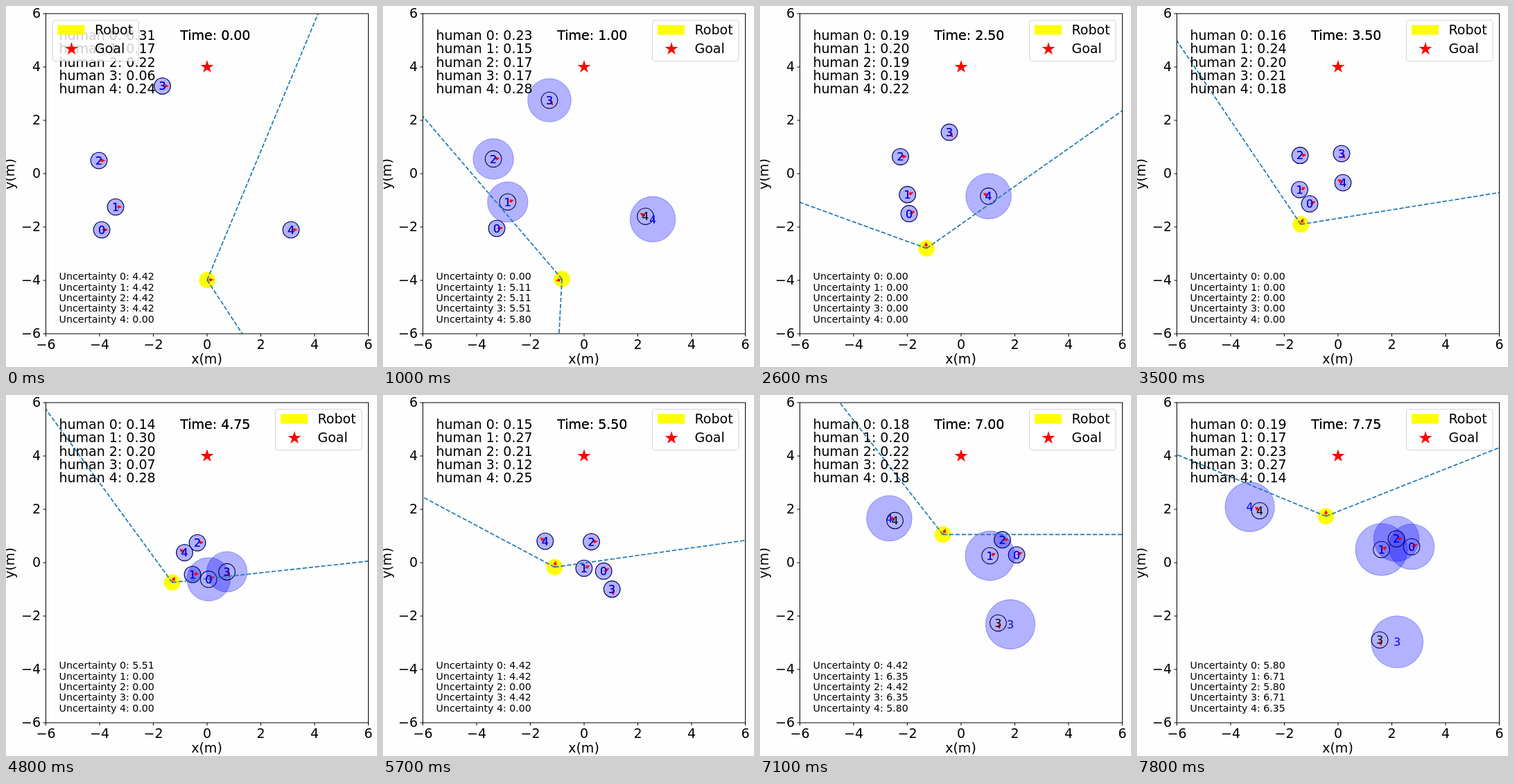
These frames come from a looping animation (535 by 521 pixels, 8000 ms). An HTML page with a canvas:

```html
<!DOCTYPE html>
<html lang="en">
<head>
<meta charset="utf-8">
<title>Robot navigation</title>
<style>
html, body { margin: 0; width: 100%; height: 100%; overflow: hidden; background: #fefefe; }
canvas { display: block; }
</style>
</head>
<body>
<canvas id="stage" width="535" height="521"></canvas>
<script>
const ctx = document.getElementById('stage').getContext('2d');
const STEPS = 32, BODY = 11.8, MARGIN = 3.8, RAD = Math.PI / 180;
const LEFT = 57.5, TOP = 11, WIDTH = 465, HEIGHT = 462;
const px = x => 290 + x * 38.75;
const py = y => 242 - y * 38.5;

// Waypoints: [step, x, y]; everyone walks straight between them
const robotPath = [[0, 290, 395.5], [4, 258, 394], [7, 248.3, 375], [12, 234.8, 333],
  [19, 239.7, 270.5], [26, 258, 219], [31, 272.4, 175]];
const humanPaths = [
  [[0, 138, 323], [4, 164, 321], [14, 249, 285.5], [31, 396, 219]],
  [[0, 158, 290], [14, 234.5, 265], [19, 269, 259], [31, 352.5, 223]],
  [[0, 134, 223], [7, 178, 219], [31, 374, 207.5]],
  [[0, 225.5, 115.5], [4, 240, 136], [14, 295, 213], [21, 328, 272], [31, 350, 353.5]],
  [[-1, 416.5, 326.8], [0, 411, 323], [14, 297, 255], [24, 218, 200], [31, 177, 167]]
];
// Turns of the robot's gaze: [step, right edge, left edge] in degrees
const gaze = [[0, -56.8, 67.4], [1, 74, 199], [3, 132, 264], [4, 130.5, 267], [6, 33, 155],
  [7, 110.6, 241.1], [11, 10, 133], [14, 9.1, 124], [18, 28, 133], [19, 6.2, 126.1],
  [21, -16.5, 104], [22, 8, 152], [26, 2.6, 129.9], [27, -19, 112], [28, 0, 128], [31, 21.6, 157.5]];
// Attention paid to the five humans
const attention = [[0, .31, .17, .22, .06, .24], [4, .23, .15, .17, .17, .28],
  [14, .16, .24, .20, .21, .18], [19, .14, .30, .20, .07, .28], [31, .19, .17, .23, .27, .14]];

function at(keys, step) {
  let i = 0;
  while (i < keys.length - 2 && keys[i + 1][0] <= step) i++;
  const [a, b] = [keys[i], keys[i + 1]];
  const u = (step - a[0]) / (b[0] - a[0]);
  return a.slice(1).map((v, j) => v + (b[j + 1] - v) * u);
}

function sees(step, [x, y]) {
  const [rx, ry] = at(robotPath, step);
  const [right, left] = at(gaze, step);
  const angle = Math.atan2(ry - y, x - rx) / RAD;
  const turn = ((angle - right) % 360 + 360) % 360;
  return turn > MARGIN && turn < left - right - MARGIN;
}

const entropy = n => n ? 4.4155 + Math.log(n) - .0012 * (n - 1) : 0;

// Unseen humans are predicted at constant velocity with growing uncertainty
function track(path) {
  const states = [];
  let lastSeen = 0;
  for (let step = 0, before = 0, unseen; step < STEPS; step++, before = unseen) {
    const pos = at(path, step), prev = at(path, step - 1);
    const seen = sees(step, pos);
    const hidden = step > 1 && before > 0;
    unseen = seen ? 0 : before + 1;
    let belief = pos;
    if (hidden) {
      const from = at(path, lastSeen), earlier = at(path, lastSeen - 1);
      belief = from.map((v, j) => v + (v - earlier[j]) * (step - lastSeen));
    }
    if (seen) lastSeen = step;
    states.push({
      pos, belief, unseen,
      radius: hidden ? 2.4 + 5.23 * entropy(before + 1) : BODY,
      angle: step ? Math.atan2(pos[1] - prev[1], pos[0] - prev[0]) : 0
    });
  }
  return states;
}
const tracks = humanPaths.map(track);

function text(str, x, y, size = 19, align = 'left', color = '#000') {
  ctx.font = `${size}px "DejaVu Sans", sans-serif`;
  ctx.textAlign = align;
  ctx.fillStyle = color;
  ctx.fillText(str, x, y);
}

function circle([x, y], r, fill, stroke) {
  ctx.beginPath();
  ctx.arc(x, y, r, 0, 2 * Math.PI);
  if (fill) { ctx.fillStyle = fill; ctx.fill(); }
  if (stroke) { ctx.strokeStyle = stroke; ctx.lineWidth = 1.1; ctx.stroke(); }
}

function star(x, y) {
  ctx.beginPath();
  for (let i = 0; i < 10; i++) {
    const r = i % 2 ? 3.8 : 10, a = i * Math.PI / 5;
    ctx.lineTo(x + r * Math.sin(a), y - r * Math.cos(a));
  }
  ctx.fillStyle = '#f00';
  ctx.fill();
}

function arrow([x, y], angle) {
  ctx.save();
  ctx.translate(x, y);
  ctx.rotate(angle);
  ctx.strokeStyle = ctx.fillStyle = '#f00';
  ctx.lineWidth = 1;
  ctx.beginPath();
  ctx.moveTo(0, 0);
  ctx.lineTo(5, 0);
  ctx.stroke();
  ctx.beginPath();
  ctx.moveTo(9.3, 0);
  ctx.lineTo(3.5, -2.8);
  ctx.lineTo(3.5, 2.8);
  ctx.fill();
  ctx.restore();
}

function ray([x, y], degrees) {
  ctx.strokeStyle = '#1f77b4';
  ctx.lineWidth = 1.7;
  ctx.setLineDash([6.3, 2.7]);
  ctx.beginPath();
  ctx.moveTo(x, y);
  ctx.lineTo(x + 800 * Math.cos(degrees * RAD), y - 800 * Math.sin(degrees * RAD));
  ctx.stroke();
  ctx.setLineDash([]);
}

function drawAxes() {
  ctx.strokeStyle = '#000';
  ctx.lineWidth = 1;
  ctx.strokeRect(LEFT, TOP, WIDTH, HEIGHT);
  for (let v = -6; v <= 6; v += 2) {
    const label = String(v).replace('-', '−');
    ctx.beginPath();
    ctx.moveTo(px(v), 473);
    ctx.lineTo(px(v), 477);
    ctx.moveTo(LEFT, py(v));
    ctx.lineTo(LEFT - 4, py(v));
    ctx.stroke();
    text(label, px(v), 495, 19, 'center');
    text(label, 50, py(v) + 6.4, 19, 'right');
  }
  text('x(m)', 289.5, 516, 19, 'center');
  ctx.save();
  ctx.translate(12, 242.5);
  ctx.rotate(-Math.PI / 2);
  text('y(m)', 0, 0, 19, 'center');
  ctx.restore();
}

function drawLegend(x) {
  ctx.beginPath();
  ctx.roundRect(x, 20.5, 124.5, 59, 4);
  ctx.fillStyle = 'rgba(255,255,255,.8)';
  ctx.strokeStyle = 'rgba(204,204,204,.8)';
  ctx.lineWidth = 1.1;
  ctx.fill();
  ctx.stroke();
  ctx.fillStyle = '#ff0';
  ctx.fillRect(x + 7.5, 27.5, 39, 14);
  star(x + 27.5, 62);
  text('Robot', x + 61, 41);
  text('Goal', x + 61, 68);
}

function draw(step) {
  const robot = at(robotPath, step);
  const [right, left] = at(gaze, step);
  const humans = tracks.map(states => states[step]);
  const share = at(attention, step);
  ctx.fillStyle = '#fefefe';
  ctx.fillRect(0, 0, 535, 521);

  ctx.save();
  ctx.beginPath();
  ctx.rect(LEFT, TOP, WIDTH, HEIGHT);
  ctx.clip();
  circle(robot, BODY, '#ff0');
  for (const h of humans) {
    circle(h.pos, BODY, null, '#000');
    circle(h.belief, h.radius, 'rgba(0,0,255,.3)', 'rgba(0,0,255,.3)');
  }
  arrow(robot, -(right + left) / 2 * RAD);
  humans.forEach(h => arrow(h.pos, h.angle));
  ray(robot, right);
  ray(robot, left);
  star(290, 88);
  ctx.restore();

  drawAxes();
  humans.forEach((h, i) => {
    text(i, h.pos[0], h.pos[1] + 5.8, 16, 'center');
    text(i, h.belief[0], h.belief[1] + 5.8, 16, 'center', '#00f');
    text(`human ${i}: ${share[i].toFixed(2)}`, 76.5, 49.1 + 19.25 * i);
    text(`Uncertainty ${i}: ${entropy(h.unseen).toFixed(2)}`, 76.5, 395.2 + 15.4 * i, 14.2);
  });
  // Overprinted, which thickens the strokes
  for (let pass = 0; pass < 2; pass++) text('Time: ' + (step / 4).toFixed(2), 251.2, 49.1);
  drawLegend(step ? 388.5 : 67);
}

function loop() {
  const tick = Math.floor(performance.now() % 8000 / 100);
  // Steps last 250 ms on a 100 ms clock; the seventh rounds down
  draw(tick === 17 ? 7 : Math.floor(tick / 2.5));
  requestAnimationFrame(loop);
}
loop();
</script>
</body>
</html>
```
